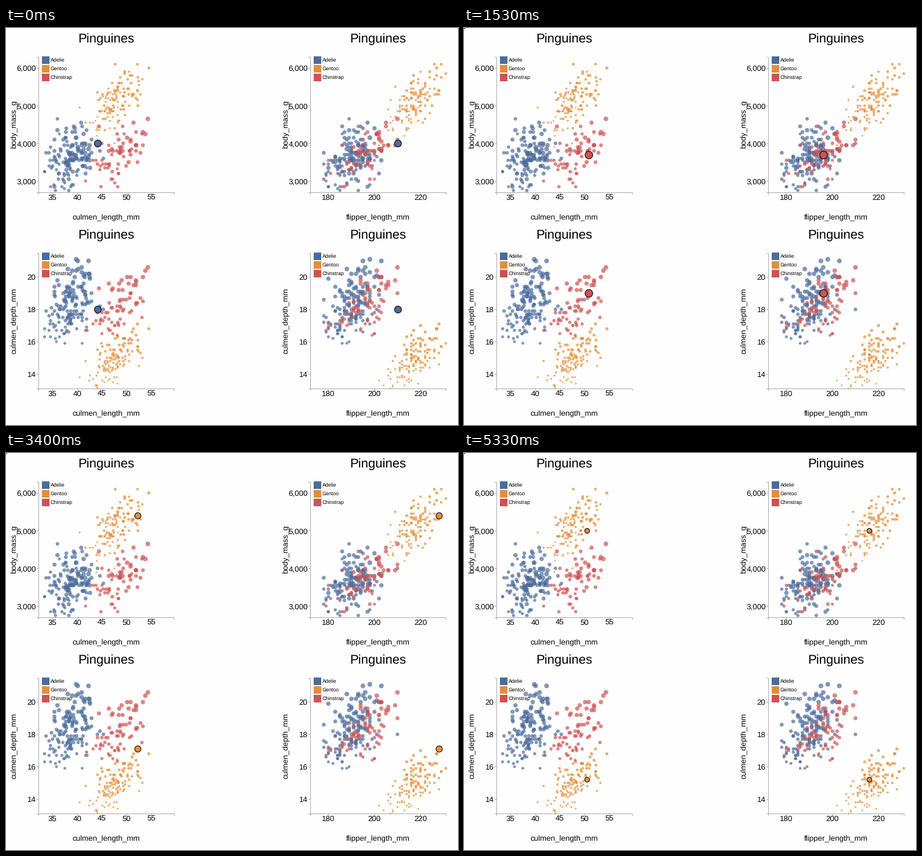
A matplotlib script that plays this animation: 780 by 686 pixels, repeating every 5660 ms.

```python
import matplotlib.pyplot as plt
import numpy as np
from matplotlib.animation import FuncAnimation

W, H, DPI = 780, 686, 100
PT = 72 / DPI                      # points per pixel
SIDE = 234.5                       # edge of one plot
LOOP, STEP = 5660, 20
TICK = 200 / 3                     # ms between pointer updates
AXIS = "#a8a8a8"

plt.rcParams.update({"font.family": "Liberation Sans", "text.hinting": "none"})

# measures of a bird: culmen length, culmen depth, flipper length, body mass
LENGTH, DEPTH, FLIPPER, MASS = range(4)
LABELS = "culmen_length_mm", "culmen_depth_mm", "flipper_length_mm", "body_mass_g"
LOW = np.array([32.1, 13.1, 172, 2700])
HIGH = np.array([59.6, 21.5, 231, 6300])
UNIT = np.array([0.1, 0.1, 1, 50])
TICKS = (range(35, 60, 5), range(14, 22, 2),
         range(180, 240, 20), range(3000, 7000, 1000))
COLUMNS, ROWS = (LENGTH, FLIPPER), (MASS, DEPTH)

# colour, count, mean, spread, correlation
SPECIES = {
    "Adelie": ("#4c6c9c", 151, (38.8, 18.4, 190, 3700), (2.7, 1.2, 6.5, 460), 0.42),
    "Gentoo": ("#e58e37", 123, (47.5, 15, 217, 5080), (3, 1, 6.5, 500), 0.7),
    "Chinstrap": ("#d05252", 68, (48.8, 18.4, 196, 3730), (3, 1.1, 7, 380), 0.57),
}

# birds the pointer visits, with the tick of arrival
VISITS = [
    (0, "Adelie", (44.1, 18.0, 210, 4000)),
    (12, "Chinstrap", (48.1, 16.4, 199, 3325)),
    (29, "Chinstrap", (51.9, 19.5, 206, 3950)),
    (39, "Chinstrap", (50.8, 19.0, 210, 4100)),
    (50, "Gentoo", (52.2, 17.1, 228, 5400)),
    (62, "Gentoo", (48.1, 15.1, 209, 5500)),
    (80, "Gentoo", (50.5, 15.2, 216, 5000)),
]
# first and last tick of each pointer movement
MOVES = [(1, 8), (12, 16), (20, 29), (35, 39), (42, 50),
         (54, 58), (61, 62), (70, 74), (78, 80)]


def scale(values, dim):
    """Position along an axis, from 0 to SIDE."""
    return (values - LOW[dim]) / (HIGH[dim] - LOW[dim]) * SIDE


def x_pos(values, col):
    return 55.5 + 469 * col + scale(values, COLUMNS[col])


def y_pos(values, row):
    return 284 + 339 * row - scale(values, ROWS[row])


def radius(depth):
    return 1.5 + (depth - LOW[DEPTH]) / 3


def area(r):
    return (2 * r * PT) ** 2


def sample(rng, n, mean, spread, corr):
    """Birds whose measures share one common size factor."""
    size, own = rng.normal(size=(4 * n, 1)), rng.normal(size=(4 * n, 4))
    z = np.sqrt(corr) * size + np.sqrt(1 - corr) * own
    birds = np.round((mean + z * spread) / UNIT) * UNIT
    keep = ((birds >= LOW) & (birds <= HIGH)).all(axis=1)
    return birds[keep & (np.abs(z) < 2.5).all(axis=1)][:n]


def build():
    rng = np.random.default_rng(7)
    birds, colors = [], []
    for name, (color, total, *shape) in SPECIES.items():
        known = np.array([bird for _, kind, bird in VISITS if kind == name])
        birds += [known, sample(rng, total - len(known), *shape)]
        colors += [color] * total
    return np.vstack(birds), np.array(colors)


data, tint = build()
fig = plt.figure(figsize=(W / DPI, H / DPI), dpi=DPI, facecolor="#fefefe")


def stage():
    ax = fig.add_axes([0, 0, 1, 1])
    ax.set(xlim=(0, W), ylim=(H, 0))
    ax.axis("off")
    return ax


def write(ax, x, y, text, size=13.4, ha="center", **kw):
    ax.text(x, y, text, fontsize=size * PT, ha=ha, va="baseline", **kw)


def line(ax, xs, ys):
    ax.plot(xs, ys, color=AXIS, lw=PT, zorder=1)


def draw_panel(ax, col, row):
    x_dim, y_dim = COLUMNS[col], ROWS[row]
    left, bottom = x_pos(LOW[x_dim], col), y_pos(LOW[y_dim], row)
    right, top, mid = left + SIDE, bottom - SIDE, left + SIDE / 2

    line(ax, [left - 3, left, left, left - 3], [top, top, bottom, bottom])
    line(ax, [left, left, right, right],
         [bottom + 3, bottom, bottom, bottom + 3])
    for v in TICKS[x_dim]:
        x = x_pos(v, col)
        line(ax, [x, x], [bottom, bottom + 3])
        write(ax, x, bottom + 12.5, str(v))
    for v in TICKS[y_dim]:
        y = y_pos(v, row)
        line(ax, [left - 3, left], [y, y])
        write(ax, left - 3.8, y + 4.8, f"{v:,}", ha="right")

    ax.scatter(x_pos(data[:, x_dim], col), y_pos(data[:, y_dim], row),
               s=area(radius(data[:, DEPTH])), c=tint, alpha=0.7,
               linewidths=0, zorder=2)

    write(ax, mid - 0.3, top - 24, "Pinguines", 22.2)
    write(ax, mid - 0.3, bottom + 47, LABELS[x_dim])
    write(ax, left - 38, bottom - SIDE / 2, LABELS[y_dim],
          rotation=90, rotation_mode="anchor")
    for i, (name, (color, *_)) in enumerate(SPECIES.items()):
        y = top + 6.2 + 15 * i
        ax.add_patch(plt.Rectangle((left + 6.5, y - 6.5), 13, 13, fc=color,
                                   lw=0, zorder=3))
        write(ax, left + 21.5, y + 2.7, name, 8.9, ha="left", zorder=4)


# the plots never change, so render them once as a backdrop
panels = [(col, row) for col in range(2) for row in range(2)]
base = stage()
for col, row in panels:
    draw_panel(base, col, row)
fig.canvas.draw()
backdrop = np.asarray(fig.canvas.buffer_rgba()).copy()
base.remove()
fig.figimage(backdrop, zorder=-1)

overlay = stage()
mark = overlay.scatter([0] * 4, [0] * 4, s=1, edgecolors="black",
                       linewidths=1.1 * PT)
corner = overlay.add_patch(plt.Rectangle((0, 0), 1.5, 1, fc="black", lw=0))

dots = np.column_stack([x_pos(data[:, LENGTH], 0), y_pos(data[:, MASS], 0)])
stops = np.array([(x_pos(b[LENGTH], 0), y_pos(b[MASS], 0)) for *_, b in VISITS])


def travel(tick):
    """Number of pointer steps made so far, pauses left out."""
    return sum(np.clip(tick - a + 1, 0, b - a + 1) for a, b in MOVES)


arrivals = [travel(tick) for tick, *_ in VISITS]


def hovered(tick):
    """Index of the bird nearest to the pointer in the first plot."""
    pointer = [np.interp(travel(tick), arrivals, axis) for axis in stops.T]
    return np.argmin(np.hypot(*(dots - pointer).T))


def update(n):
    tick = int((n * STEP + 17) / TICK)
    i = hovered(tick)
    bird = data[i]
    mark.set_offsets([(x_pos(bird[COLUMNS[col]], col), y_pos(bird[ROWS[row]], row))
                      for col, row in panels])
    mark.set_sizes([area(1.9 * radius(bird[DEPTH]))])
    mark.set_facecolor(tint[i])
    corner.set_visible(tick > 0)
    return mark, corner


anim = FuncAnimation(fig, update, frames=LOOP // STEP, interval=STEP,
                     repeat=True, repeat_delay=0)
plt.show()
```
